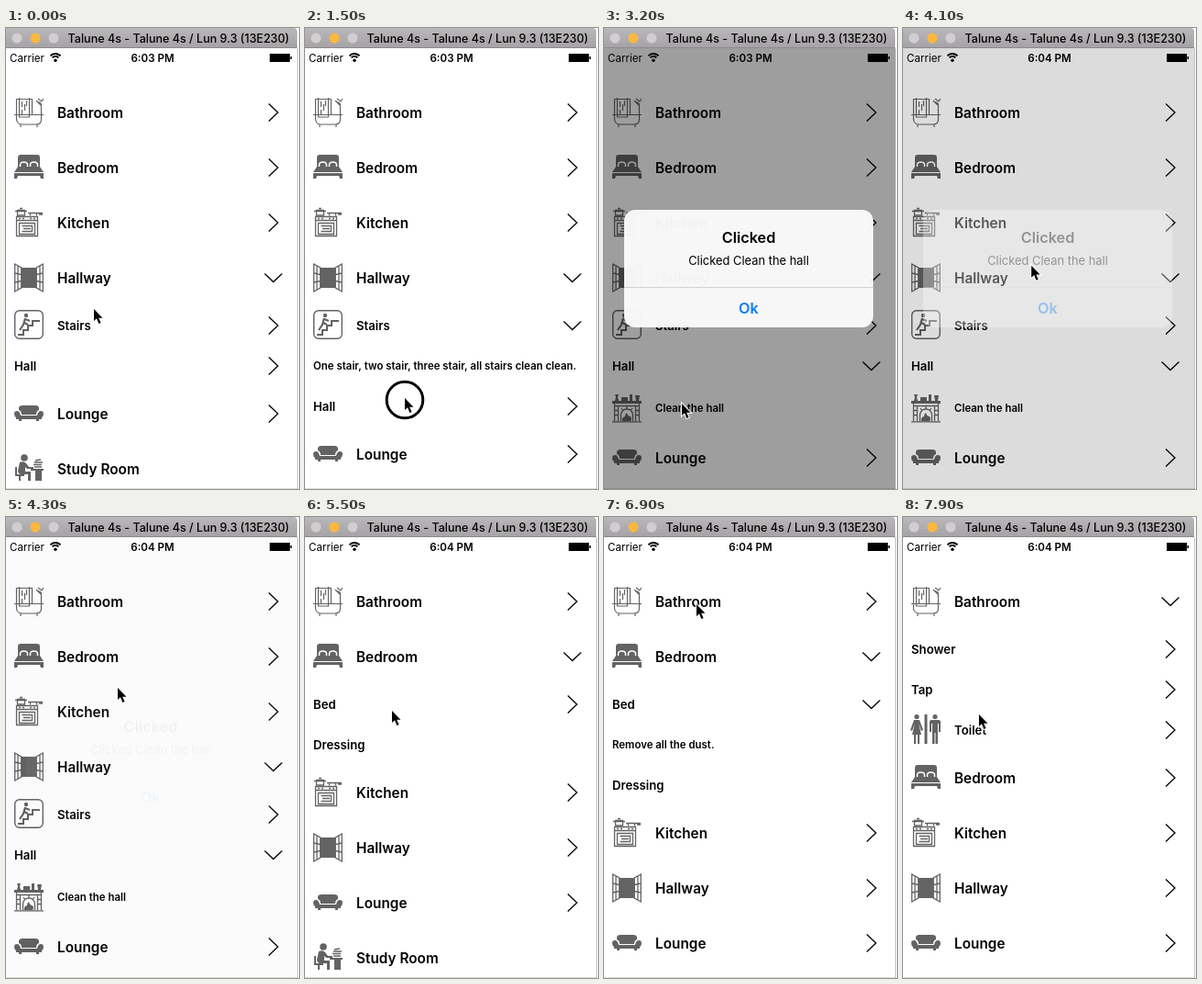
Animation of 320x502 px, one loop 8000 ms. Source, as an HTML page with a canvas:

```html
<!DOCTYPE html>
<html lang="en">
<head>
<meta charset="utf-8">
<title>Room list</title>
<style>
html, body { margin: 0; width: 100%; height: 100%; overflow: hidden; background: #fff; }
canvas { display: block; width: 320px; height: 502px; }
</style>
</head>
<body>
<canvas id="stage" width="320" height="502"></canvas>
<script>
const ctx = document.getElementById('stage').getContext('2d');
const LOOP = 8000, STEP = 100, SLIDE = 300;
const GRAY = '#636363';

const ease = k => k * k * (3 - 2 * k);
const clamp = k => Math.max(0, Math.min(1, k));
const progress = (t, start, length) => clamp((t - start) / length);

function text(str, x, y, size, weight = 600, color = '#000', align = 'left') {
  ctx.font = `${weight} ${size}px Inter, sans-serif`;
  ctx.fillStyle = color;
  ctx.textAlign = align;
  ctx.fillText(str, x, y + size * 0.364);
}

function ink(path, color = GRAY) {
  ctx.fillStyle = color;
  ctx.fill(new Path2D(path));
}

function pen(path, width = 1, color = GRAY) {
  ctx.strokeStyle = color;
  ctx.lineWidth = width;
  ctx.stroke(new Path2D(path));
}

function dot(x, y, r, color = GRAY) {
  ctx.beginPath();
  ctx.arc(x, y, r, 0, Math.PI * 2);
  ctx.fillStyle = color;
  ctx.fill();
}

// Each icon fills a 32 by 32 box.
const icons = {
  bath() {
    pen('M0 18.5h32M2.5 19v5q1 5 6 5h15q6 0 6-5v-5M7 29v3M25 29v3M29.5 18V7q-1-3-4-2M24 3l5 5M26 1l4 3 2-3', 1.2);
    pen('M2.5 18V1.5h17v17M5.5 0v21h11V0M8.5 4v6M11.5 7v7M8.5 13v5M13.5 3v6', 1.2);
  },
  bed() {
    ink('M4 15V5q0-3 3-3h18q3 0 3 3v10z');
    pen('M6.5 15v-2q0-3 4-3t4 3v2M17.5 15v-2q0-3 4-3t4 3v2', 1.5, '#fff');
    ink('M4 15h24l4 6H0zM0 22h32v6h-3l-1-3H4l-1 3H0z');
  },
  stove() {
    pen('M2.5 9.5h23v21h-23zM2.5 13.5h23M5.5 16.5h17v12h-17zM8.5 19.5h11v6h-11M10 22.5h8', 1.3);
    pen('M3.5 8V2.5h8V8zM1 3.5h13M6 .5h3M17.5 8.5v-3h7v3M15 5.5h16M27 7h4', 1.3);
    for (const x of [6, 10, 18, 22]) dot(x, 11.5, 1);
  },
  window() {
    ink('M8 5h16v22H8z');
    pen('M.7 1l7 4v22l-7 4zM.7 11l7 1.5M.7 21l7-1.5M4 3v26M31.3 1l-7 4v22l7 4zM31.3 11l-7 1.5M31.3 21l-7-1.5M28 3v26', 1.3);
  },
  stairs() {
    ctx.beginPath();
    ctx.roundRect(0.7, 0.7, 30.6, 30.6, 5);
    ctx.strokeStyle = GRAY;
    ctx.lineWidth = 1.4;
    ctx.stroke();
    pen('M4 27h6v-5h5v-5h5v-5h8', 2);
    dot(13, 6, 2.2);
    pen('M12 9l-2 7-4 6M11 14l4 2M12 10l5 2', 2.2);
  },
  sofa() {
    ink('M5 12v-2q0-3 4-3h14q4 0 4 3v2q-3 1-3 5H8q0-4-3-5z');
    ink('M0 16q0-3 3-3t4 5h18q1-5 4-5t3 3-2 4v2H2v-2q-2-1-2-4zM5 22h3v2H5zM24 22h3v2h-3z');
  },
  study() {
    dot(11, 4, 3.8);
    ink('M6 9q4-2 7 1l3 4h5v2h-7l-2-2v5h6v10h-3v-7H7q-3-1-3-4z');
    ink('M1 14h2v8h8v2H7v5H5v-5H1zM18 16h14v2h-2v11h-7V18h-5z');
    pen('M22 14h8M21 11.5h9M22 9h9M23 7l6-1', 1.5);
  },
  hearth() {
    ink('M0 8h32v3H0zM3 1h4l-1 3 1 4H3l1-4zM10 4h7v4h-7zM19 1h3v7h-3zM25 2h5l-1 6h-3z');
    pen('M2.5 11v19M6.5 14v16M25.5 14v16M29.5 11v19M2 13.5h28M0 30.8h32M3 18.5h3M3 23.5h3M26 18.5h3M26 23.5h3', 1.3);
    pen('M9.5 30v-7q1-6 6.5-6t6.5 6v7M16 14v3M10 16l2 3M22 16l-2 3', 1.3);
    ink('M11 30q-1-4 3-5 0-3 2-4 1 4 4 4 2 3 0 5z');
  },
  toilet() {
    dot(6, 2.5, 2.6);
    dot(26, 2.5, 2.6);
    ink('M3 6h6l4 11-2 1-3-8 3 12H9v10H7V22H5v10H3V22H1l3-12-3 8-2-1z');
    ink('M14.5 0h3v32h-3z');
    ink('M22 6h8q2 0 2 2v11h-2V10h-1v22h-2.5V20h-1v12H23V10h-1v9h-2V8q0-2 2-2z');
  }
};

const room = (name, icon, kids, arrow = true) =>
  ({ name, icon, kids, arrow, height: 60, size: 15.35 });
const part = (name, kids, arrow = true, icon) =>
  ({ name, icon, kids, arrow, height: 44, size: 13.2, lift: 1 });
const task = (name, icon) =>
  ({ name, icon, arrow: false, height: icon ? 48 : 44, size: 11.45 });

const rooms = [
  room('Bathroom', 'bath', [part('Shower'), part('Tap'), part('Toilet', [], true, 'toilet')]),
  room('Bedroom', 'bed', [part('Bed', [task('Remove all the dust.')]), part('Dressing', [], false)]),
  room('Kitchen', 'stove'),
  room('Hallway', 'window', [
    part('Stairs', [task('One stair, two stair, three stair, all stairs clean clean.')], true, 'stairs'),
    part('Hall', [task('Clean the hall', 'hearth')])
  ]),
  room('Lounge', 'sofa'),
  room('Study Room', 'study', [], false)
];

const states = [
  { at: -SLIDE, open: ['Hallway'] },
  { at: 300, open: ['Hallway', 'Stairs'] },
  { at: 1700, open: ['Hallway', 'Hall'] },
  { at: 4900, open: ['Bedroom'] },
  { at: 6000, open: ['Bedroom', 'Bed'] },
  { at: 7200, open: ['Bathroom'] }
];

function layout(open) {
  const places = new Map();
  let top = 62;
  const visit = item => {
    places.set(item, top + item.height / 2);
    top += item.height;
    if (open.includes(item.name)) (item.kids || []).forEach(visit);
  };
  rooms.forEach(visit);
  return places;
}
states.forEach(s => { s.places = layout(s.open); });

function drawRow(item, y, alpha, open) {
  ctx.save();
  ctx.globalAlpha = alpha;
  if (item.icon) {
    ctx.save();
    ctx.translate(9, y - 16 - (item.lift || 0));
    icons[item.icon]();
    ctx.restore();
  }
  text(item.name, item.icon ? 56 : 9, y, item.size);
  if (item.arrow) {
    ctx.translate(292, y);
    pen(open ? 'M-9.5-4.5L0 4.5 9.5-4.5' : 'M-5-9.5L5 0-5 9.5', 1.3, '#000');
  }
  ctx.restore();
}

function drawList(t) {
  const i = states.findLastIndex(s => s.at <= t);
  const now = states[i], before = states[Math.max(0, i - 1)];
  const k = ease(progress(t, now.at, SLIDE));
  for (const item of new Set([...before.places.keys(), ...now.places.keys()])) {
    const from = before.places.get(item), to = now.places.get(item);
    const y = from === undefined ? to : to === undefined ? from : from + (to - from) * k;
    const alpha = from === undefined ? k : to === undefined ? 1 - k : 1;
    if (alpha > 0) drawRow(item, y, alpha, now.open.includes(item.name));
  }
  pen('M0 501.5h318', 1, '#dedede');
}

function drawStatus(t) {
  text('Carrier', 4, 32.3, 11.6, 400);
  text(t < 4000 ? '6:03 PM' : '6:04 PM', 160, 32.3, 11.6, 600, '#000', 'center');
  dot(54, 35.3, 1.7, '#000');
  for (const r of [4.4, 7.3]) {
    ctx.beginPath();
    ctx.arc(54, 35.3, r, -Math.PI * 0.77, -Math.PI * 0.23);
    ctx.strokeStyle = '#000';
    ctx.lineWidth = 1.9;
    ctx.stroke();
  }
  ink('M288 28h22v9h-22zM310.5 31h1.5v3h-1.5z', '#000');
}

function drawAlert(t) {
  const shown = ease(progress(t, 2600, 300));
  const gone = progress(t, 3900, 500);
  const alpha = shown * (1 - gone) ** 2;
  if (alpha <= 0) return;
  ctx.save();
  ctx.globalAlpha = alpha;
  ctx.fillStyle = 'rgba(0,0,0,.38)';
  ctx.fillRect(0, 22, 318, 480);
  const scale = 1.2 - 0.2 * shown;
  ctx.translate(158, 262);
  ctx.scale(scale, scale);
  ctx.beginPath();
  ctx.roundRect(-136, -64, 272, 128, 12);
  ctx.fillStyle = 'rgba(250,250,250,.97)';
  ctx.fill();
  pen('M-136 20.5h272', 1, '#d2d2d6');
  text('Clicked', 0, -34, 16.3, 600, '#000', 'center');
  text('Clicked Clean the hall', 0, -8.5, 12.9, 400, '#000', 'center');
  text('Ok', 0, 43, 16.3, 600, '#0a7cf5', 'center');
  ctx.restore();
}

function drawWindow() {
  ctx.fillStyle = '#fff';
  ctx.fillRect(318, 0, 2, 502);
  pen('M318.5 22v480', 1, '#c4c4c4');
  const bar = ctx.createLinearGradient(0, 0, 0, 22);
  bar.addColorStop(0, '#bab7ba');
  bar.addColorStop(1, '#a5a2a5');
  ctx.beginPath();
  ctx.roundRect(0, 0, 318, 22, [0, 4, 0, 0]);
  ctx.fillStyle = bar;
  ctx.fill();
  pen('M0 21.5h318', 1, '#8c898c');
  dot(12, 11, 5.5, '#d0ced0');
  dot(32, 11, 5.5, '#fcb73e');
  dot(52, 11, 5.5, '#d0ced0');
  text('Talune 4s - Talune 4s / Lun 9.3 (13E230)', 188.5, 11.5, 12.55, 500, '#000', 'center');
}

// Pointer path: time, x, y
const path = [
  [0, 96, 306], [100, 96, 318], [500, 97, 320], [900, 106, 378], [1100, 109, 403],
  [1800, 109, 403], [2200, 85, 409], [3300, 85, 409], [3700, 152, 306], [3950, 152, 306],
  [4300, 122, 186], [4600, 100, 157], [5000, 100, 157], [5400, 95, 211], [6150, 95, 211],
  [6500, 104, 112], [6600, 104, 112], [6800, 101, 95], [7200, 101, 95],
  [7500, 120, 297], [7600, 124, 308], [7900, 83, 215]
];
const clicks = [100, 1500, 2400, 3750, 4700, 5700, 7000];

function drawPointer(t) {
  const i = Math.min(path.findLastIndex(p => p[0] <= t), path.length - 2);
  const [t0, x0, y0] = path[i], [t1, x1, y1] = path[i + 1];
  const k = ease(progress(t, t0, t1 - t0));
  ctx.save();
  ctx.translate(x0 + (x1 - x0) * k, y0 + (y1 - y0) * k);
  if (clicks.some(c => t >= c && t < c + 200)) {
    ctx.beginPath();
    ctx.arc(0, 2, 19.8, 0, Math.PI * 2);
    ctx.strokeStyle = '#000';
    ctx.lineWidth = 3;
    ctx.stroke();
  }
  const arrow = 'M0 0v13l3-2.7 2.4 5.7 2.2-1-2.4-5.3h4.3z';
  pen(arrow, 2, '#fff');
  ink(arrow, '#000');
  ctx.restore();
}

function draw() {
  const t = Math.floor((performance.now() % LOOP) / STEP) * STEP;
  ctx.fillStyle = '#fff';
  ctx.fillRect(0, 0, 320, 502);
  drawList(t);
  drawStatus(t);
  drawAlert(t);
  drawWindow();
  drawPointer(t);
  requestAnimationFrame(draw);
}
draw();
</script>
</body>
</html>
```
